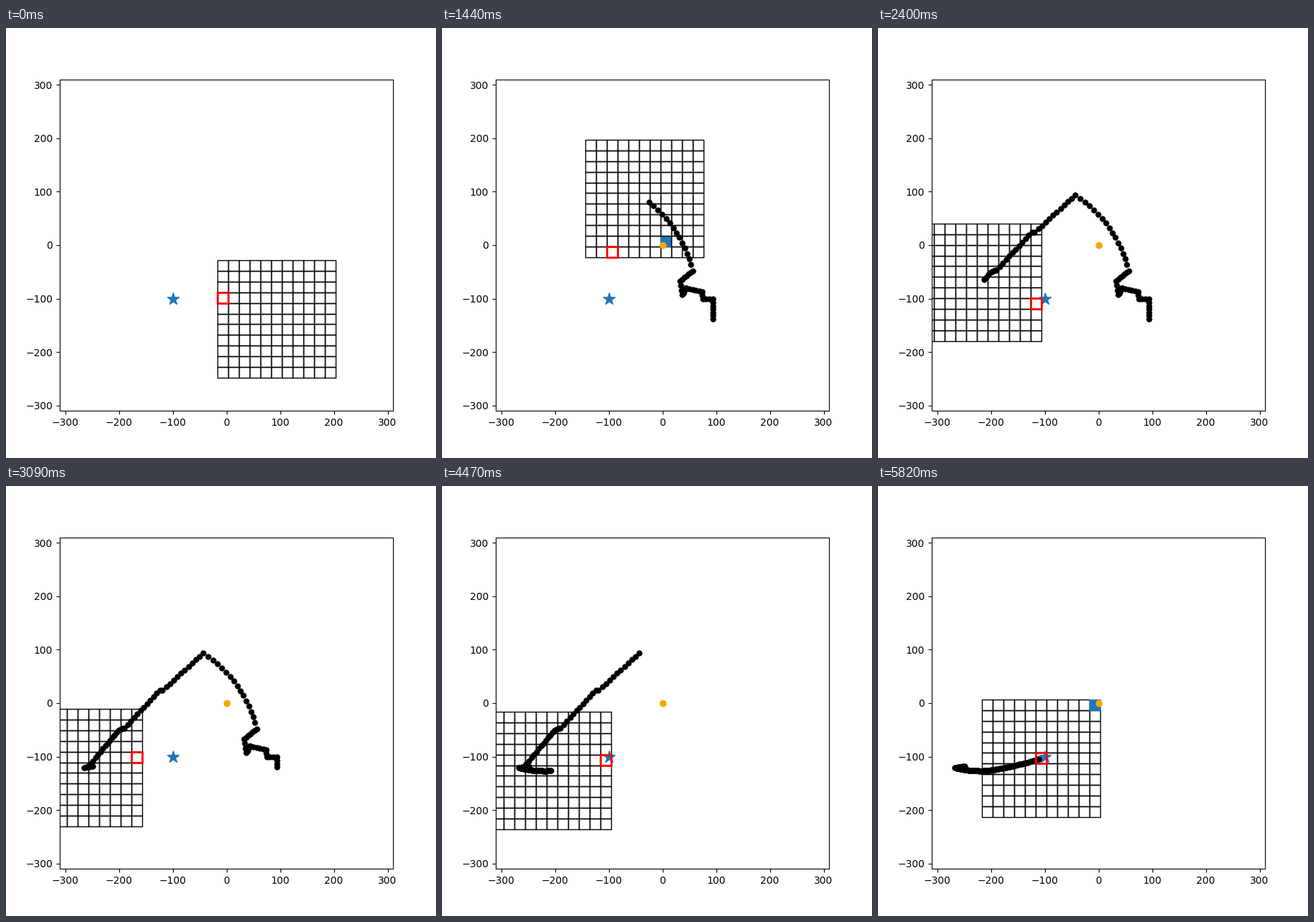
Animation, 600 px wide and 600 px high, one loop 5.85 s. Source, as a matplotlib script:

```python
import numpy as np
import matplotlib.pyplot as plt
from matplotlib.animation import FuncAnimation
from matplotlib.collections import PolyCollection
from matplotlib.patches import Rectangle

FRAMES = 195
CELLS, SIZE = 11, 20
HALF = CELLS * SIZE / 2
TRAIL = 100
GOAL = np.array([-100, -100])
OBSTACLE = np.array([0, 0])
START = np.array([93.5, -138.2])

# Legs of the drive: steps, end x, end y, then optional bend and pace
LEGS = [
    (6, 94, -101), (3, 74.7, -100.6), (2, 74, -87.5), (5, 44, -80),
    (4, 43.3, -80), (4, 37.3, -92.6), (3, 33.3, -67), (6, 56, -48),
    (16, -43, 94, -16.6), (11, -118.7, 24.2), (1, -124, 24.8),
    (11, -190, -46.3), (4, -201.3, -51), (12, -254, -114.5, 0, 0.81),
    (6, -249.3, -118.1), (9, -266.7, -120.8),
    (44, -208.7, -126.6, -2.2, 0.56), (47, -106.7, -103.2, -2.4, 0.64),
]


def drive(start, steps, x, y, bend=0, pace=1):
    """Parabola bulging by bend to the left; pace is the starting speed."""
    t = np.arange(1, steps + 1)[:, None] / steps
    s = pace * t + (1 - pace) * t ** 2
    way = np.array([x, y]) - start
    left = np.array([-way[1], way[0]]) / np.hypot(*way)
    return start + s * way + 4 * s * (1 - s) * bend * left


path = START[None]
for leg in LEGS:
    path = np.vstack([path, drive(path[-1], *leg)])
seen_at = int(np.argmax(np.all(np.abs(path - OBSTACLE) <= HALF, axis=1)))

# Cell outlines relative to the lower left corner, column by column
square = np.array([(0, 0), (1, 0), (1, 1), (0, 1)]) * SIZE
cells = np.array([square + (i * SIZE, j * SIZE)
                  for i in range(CELLS) for j in range(CELLS)])

fig, ax = plt.subplots(figsize=(6, 6), dpi=100)
ax.set_xlim(-310, 310)
ax.set_ylim(-310, 310)

grid = PolyCollection([], linewidths=1, zorder=1)
ax.add_collection(grid, autolim=False)
trail, = ax.plot([], [], 'ko', markersize=5, zorder=2)
obstacle = ax.scatter(*OBSTACLE, color='orange', zorder=3)
ax.scatter(*GOAL, s=150, marker='*', color='C0', zorder=3)
target = Rectangle((0, 0), SIZE, SIZE, fill=False, ec='red', lw=2, zorder=4)
ax.add_patch(target)


def cell_of(point, origin):
    return np.floor((point - origin) / SIZE).astype(int)


def update(n):
    origin = path[n] - HALF
    faces, edges = ['none'] * CELLS ** 2, ['black'] * CELLS ** 2
    col, row = cell_of(OBSTACLE, origin)
    if 0 <= col < CELLS and 0 <= row < CELLS:
        faces[col * CELLS + row] = edges[col * CELLS + row] = 'C0'
    grid.set_verts(cells + origin)
    grid.set_facecolor(faces)
    grid.set_edgecolor(edges)

    # Cell nearest to the goal
    target.set_xy(origin + SIZE * np.clip(cell_of(GOAL, origin), 0, CELLS - 1))
    trail.set_data(*path[max(0, n - TRAIL):n].T)
    obstacle.set_visible(n >= seen_at)
    return grid, trail, obstacle, target


anim = FuncAnimation(fig, update, frames=FRAMES, interval=30, repeat=True,
                     repeat_delay=0, blit=False)
plt.show()
```
